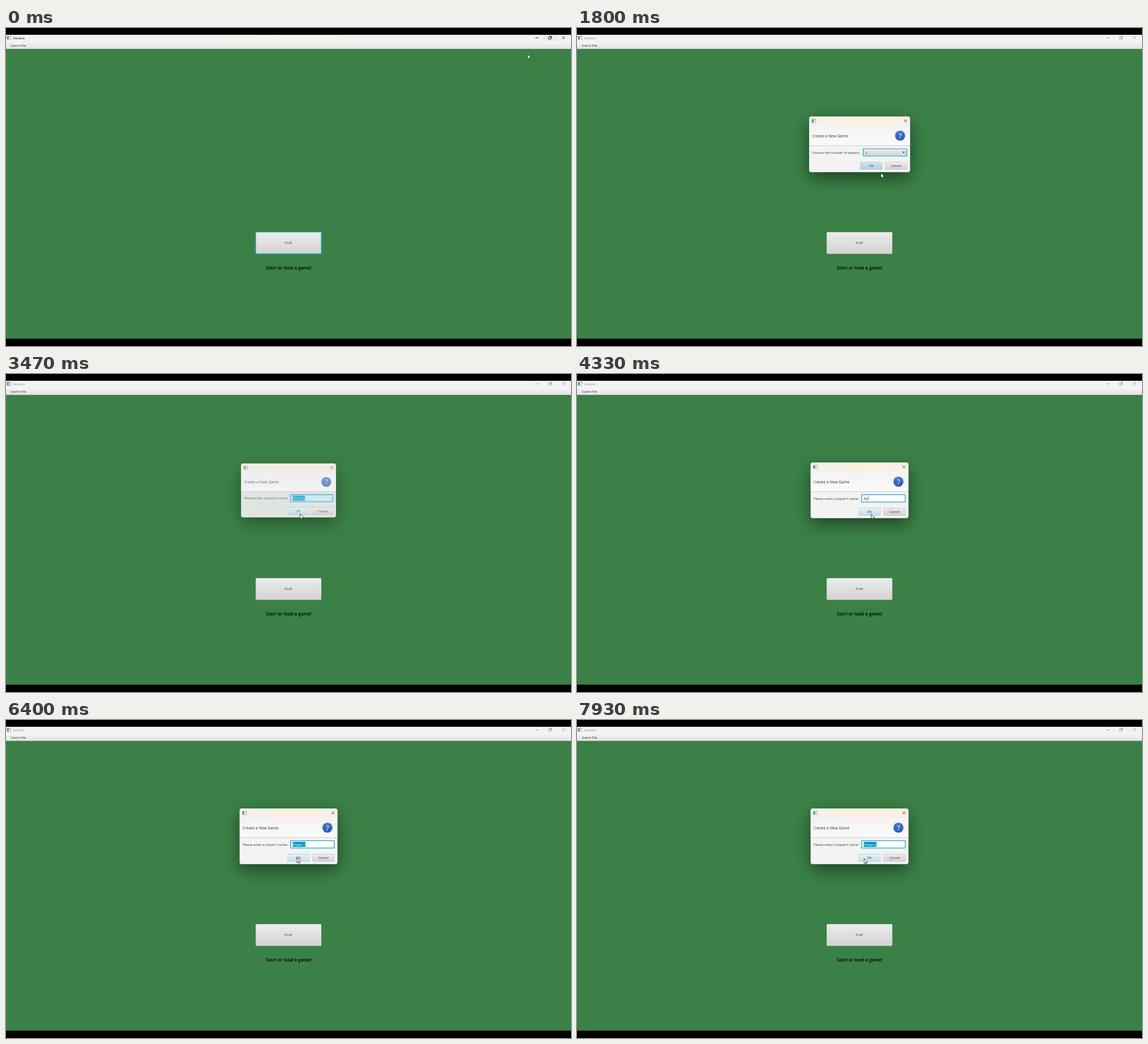
An HTML page with a canvas that plays this animation: 998x561 px, repeating every 8 s.

```html
<!DOCTYPE html>
<html lang="en">
<head>
<meta charset="utf-8">
<title>New game</title>
<style>
html, body { margin: 0; width: 100%; height: 100%; overflow: hidden; background: #000; }
canvas { display: block; width: 998px; height: 561px; }
</style>
</head>
<body>
<canvas id="stage" width="998" height="561"></canvas>
<script>
const ctx = document.getElementById('stage').getContext('2d');
const LOOP = 8000, STEP = 1000 / 15;
const UI = '"Open Sans", "Noto Sans", sans-serif';
const CYAN = '#16a5c8', INK = '#333';

// Pointer stops: time, x, y
const STOPS = [
  [60, 921, 46], [600, 524, 376], [1400, 524, 376], [1990, 541, 217],
  [2200, 541, 217], [2790, 530.5, 248], [2990, 530.5, 248], [3260, 519.5, 247],
  [5070, 519.5, 247], [5520, 464.5, 246], [5900, 464.5, 246], [6500, 518, 243],
  [6650, 518, 243], [6860, 515.5, 242], [6980, 515.5, 242], [7380, 511, 243],
  [7540, 511, 243], [7920, 507, 244.5]
];

// Dialogs: opening time, closing time, painter
const DIALOGS = [
  [1330, 3380, playersDialog],
  [3440, 4590, (t, m) => nameDialog(t, m, 0, true)],
  [4590, 5760, kindDialog],
  [5820, 6620, (t, m) => nameDialog(t, m, 1)],
  [6650, 7480, kindDialog],
  [7550, 9000, (t, m) => nameDialog(t, m, 2)]
];

const clamp = v => Math.max(0, Math.min(1, v));
const ease = v => v * v * (3 - 2 * v);

function pointerAt(t) {
  let [, x, y] = STOPS[0];
  for (let i = 1; i < STOPS.length; i++) {
    const [t0, x0, y0] = STOPS[i - 1], [t1, x1, y1] = STOPS[i];
    if (t < t0) break;
    const k = ease(clamp((t - t0) / (t1 - t0)));
    x = x0 + (x1 - x0) * k;
    y = y0 + (y1 - y0) * k;
  }
  return { x, y };
}

function rect(x, y, w, h, fill) {
  ctx.fillStyle = fill;
  ctx.fillRect(x, y, w, h);
}

function round(x, y, w, h, r, fill) {
  ctx.beginPath();
  ctx.roundRect(x, y, w, h, r);
  ctx.fillStyle = fill;
  ctx.fill();
}

function blend(x0, y0, x1, y1, ...colors) {
  const g = ctx.createLinearGradient(x0, y0, x1, y1);
  colors.forEach((c, i) => g.addColorStop(i / (colors.length - 1), c));
  return g;
}

// Type is laid out at ten times the size so that small advances stay exact
function text(s, x, y, { size = 5.9, color = INK, align = 'left', style = '', skew = 0 } = {}) {
  ctx.save();
  ctx.translate(x, y);
  ctx.transform(0.1, 0, skew * 0.1, 0.1, 0, 0);
  ctx.font = `${style} ${size * 10}px ${UI}`;
  ctx.textAlign = align;
  ctx.fillStyle = color;
  ctx.fillText(s, 0, 0);
  ctx.restore();
}

function line(color, width, ...pts) {
  ctx.beginPath();
  for (let i = 0; i < pts.length; i += 2) ctx.lineTo(pts[i], pts[i + 1]);
  ctx.strokeStyle = color;
  ctx.lineWidth = width;
  ctx.stroke();
}

function cross(x, y, color) {
  line(color, 0.8, x - 2.4, y - 2.4, x + 2.4, y + 2.4);
  line(color, 0.8, x + 2.4, y - 2.4, x - 2.4, y + 2.4);
}

function windowIcon(x, y) {
  rect(x, y, 7.6, 6.6, '#8b9699');
  rect(x + 0.7, y + 1, 6.2, 4.9, '#f2f5f5');
  rect(x + 0.9, y + 1.3, 2.5, 4.2, '#427a78');
}

function button(label, x, y, w, h, mouse, { focus, primary } = {}) {
  const over = mouse && mouse.x >= x && mouse.x <= x + w && mouse.y >= y && mouse.y <= y + h;
  let colors = over ? ['#fafafa', '#e2e2e2'] : ['#ececec', '#d3d3d3'];
  if (primary) colors = over ? ['#e6f2f7', '#c8dfe8'] : ['#d3e6ee', '#b0cfdb'];
  if (focus) {
    round(x - 0.6, y - 0.6, w + 1.2, h + 1.2, 1.8, CYAN);
    round(x + 0.6, y + 0.6, w - 1.2, h - 1.2, 1, blend(0, y, 0, y + h, ...colors));
  } else {
    round(x, y, w, h + 0.4, 1.6, primary ? '#8fb0bd' : '#adadad');
    round(x + 0.5, y + 0.5, w - 1, h - 1, 1.2, blend(0, y, 0, y + h, '#fff', colors[1]));
    round(x + 0.5, y + 1, w - 1, h - 1.5, 1.2, blend(0, y, 0, y + h, ...colors));
  }
  text(label, x + w / 2, y + h / 2 + 2.1, { align: 'center' });
}

function mainWindow(t, mouse) {
  const active = t < 1330;
  const tone = active ? '#111' : '#919191';
  rect(0, 0, 998, 561, '#000');
  rect(0, 12, 998, 12, active
    ? blend(0, 0, 998, 0, '#f1f3f4', '#f3f3f1', '#f8f3ea', '#f4f3f0', '#f2f3f3')
    : '#f3f3f3');
  windowIcon(1.4, 14);
  text(NAMES.game, 12.5, 20, { color: tone });

  if (t < 130) rect(949, 12, 24, 11.5, '#e9e9e8');
  line(tone, 0.9, 935, 17.4, 940.4, 17.4);
  ctx.lineWidth = 0.8;
  ctx.strokeRect(958.6, 15.8, 3.8, 3.8);
  line(tone, 0.8, 960, 14.6, 963.5, 14.6, 963.5, 18.4);
  cross(984.8, 17, tone);

  rect(0, 24, 998, 13, blend(0, 24, 0, 37, '#f6f6f6', '#e1e1e1'));
  rect(0, 36.4, 998, 0.6, '#c3c8c3');
  text('Game File', 8.4, 32.5);
  rect(0, 37, 998, 511, '#3b8147');
  rect(0, 547.5, 998, 0.8, '#2b5c34');

  button('PLAY', 441, 360, 116, 38.3, active && mouse, { focus: active });
  text('Start or load a game!', 499.6, 425.8,
    { size: 8.35, color: '#000', align: 'center', style: 'italic 600', skew: 0.15 });
}

function dialogFrame(x, y, w, h) {
  const r = x + w;
  ctx.save();
  ctx.shadowColor = 'rgba(0,0,0,.5)';
  ctx.shadowBlur = 30;
  ctx.shadowOffsetY = 10;
  round(x, y, w, h, 4, '#f2f2f2');
  ctx.restore();

  ctx.save();
  ctx.beginPath();
  ctx.roundRect(x, y, w, h, 4);
  ctx.clip();
  rect(x, y, w, h, '#f3f3f3');
  rect(x, y, w, 16, blend(x, 0, r, 0, '#f2f2ee', '#faf0e2', '#fbf0e2', '#f7f1e8'));
  rect(x, y + 16, w, 35, blend(0, y + 16, 0, y + 51, '#f3f3f3', '#fafafa'));
  rect(x, y + 50.7, w, 0.7, '#bdbdbd');
  ctx.restore();

  windowIcon(x + 4.6, y + 4.4);
  cross(r - 7.9, y + 7.6, '#222');
  text('Create a New Game', x + 5.4, y + 36.2, { size: 6.85 });

  const cx = r - 17.6, cy = y + 33.6;
  for (const [rad, fill] of [[10.4, '#cfd3d8'], [9.9, '#fff'],
    [8.9, blend(0, cy - 9, 0, cy + 9, '#4a79c6', '#2758ab')]]) {
    ctx.beginPath();
    ctx.arc(cx, cy, rad, 0, 7);
    ctx.fillStyle = fill;
    ctx.fill();
  }
  text('?', cx, cy + 4.7, { size: 13, color: '#fff', align: 'center' });
}

function playersDialog(t, mouse) {
  dialogFrame(410, 156.3, 178.3, 98);
  text('Choose the number of players:', 415.3, 221.7);
  const open = t >= 2130 && t < 2920;
  button('OK', 500, 236.2, 39.3, 13, !open && mouse, { primary: true });
  button('Cancel', 544, 236.2, 39.3, 13, !open && mouse);
  button('', 505.5, 213, 77.3, 13, mouse, { focus: true });
  text(t < 2920 ? '2' : '3', 509.3, 221.7);
  ctx.beginPath();
  ctx.moveTo(574.6, 218.3);
  ctx.lineTo(579.2, 218.3);
  ctx.lineTo(576.9, 220.8);
  ctx.fillStyle = INK;
  ctx.fill();
  if (open) playersList(mouse);
}

function playersList(mouse) {
  const x = 505.4, y = 226.2, w = 77.6, row = 13;
  ctx.save();
  ctx.shadowColor = 'rgba(0,0,0,.45)';
  ctx.shadowBlur = 8;
  ctx.shadowOffsetY = 2;
  rect(x, y, w, row * 5 + 1, '#fff');
  ctx.restore();
  const hover = Math.floor((mouse.y - y) / row);
  for (let i = 0; i < 5; i++) {
    const lit = i === 0 || i === hover;
    if (lit) rect(x + 0.3, y + i * row, w - 0.6, row, '#0fa2c4');
    text(String(i + 2), x + 2.9, y + i * row + 8.9, { color: lit ? '#fff' : INK });
  }
  if (hover === 1) rect(x + 0.3, y + row - 0.2, w - 0.6, 0.4, '#3db5cf');
}

function nameDialog(t, mouse, index, typed) {
  dialogFrame(412.7, 156.3, 172.7, 98);
  text("Please enter a player's name:", 418, 221.7, { size: 5.86 });
  round(502, 212.3, 78.5, 14.2, 1.8, CYAN);
  round(503.3, 213.6, 75.9, 11.6, 1, '#fff');
  if (typed && t >= 4065) {
    const count = t < 4265 ? 1 : t < 4330 ? 2 : 3;
    text(NAMES.player.slice(0, count), 506.8, 221.7);
    rect(506.8 + [0, 3.9, 7.1, 10.2][count], 214.8, 0.6, 8.8, '#222');
  } else {
    rect(506.4, 214.9, 22.6, 9, '#0b97c0');
    text('Player ' + index, 506.8, 221.7, { color: '#fff' });
  }
  button('OK', 496.9, 236.2, 39.3, 13, mouse, { primary: true });
  button('Cancel', 541, 236.2, 39.3, 13, mouse);
}

function kindDialog(t, mouse) {
  dialogFrame(405.3, 155.9, 187.3, 100.6);
  text('Choose whether this player is a human player or a', 410.6, 222.3, { size: 5.88 });
  text('computerized opponent.', 410.6, 231.2, { size: 5.88 });
  button('Human', 435.5, 238.3, 39, 12.7, mouse, { focus: true, primary: true });
  button('Computer', 479.6, 238.3, 39, 12.7, mouse);
  button('Cancel', 548.2, 238.3, 39, 12.7, mouse);
}

function pointer({ x, y }) {
  const shape = [0, 0, 0, 8.7, 2, 6.9, 3.3, 9.8, 4.6, 9.2, 3.4, 6.4, 6.1, 6.3];
  ctx.beginPath();
  for (let i = 0; i < shape.length; i += 2) ctx.lineTo(x + shape[i], y + shape[i + 1]);
  ctx.closePath();
  ctx.fillStyle = '#fff';
  ctx.fill();
  ctx.strokeStyle = '#111';
  ctx.lineWidth = 0.7;
  ctx.stroke();
}

const NAMES = { game: 'Vendoli', player: 'Bex' };

function render(t) {
  const mouse = pointerAt(t);
  mainWindow(t, mouse);
  for (const [start, end, paint] of DIALOGS) {
    if (t < start || t >= end) continue;
    const k = clamp(0.5 + (t - start) / 130);
    ctx.save();
    ctx.globalAlpha = k;
    ctx.translate(499, 206);
    ctx.scale(0.9 + 0.1 * k, 0.9 + 0.1 * k);
    ctx.translate(-499, -206);
    paint(t, mouse);
    ctx.restore();
  }
  pointer(mouse);
}

const began = performance.now();
function tick() {
  const t = (performance.now() - began) % LOOP;
  render(Math.floor((t + 1) / STEP) * STEP);
  requestAnimationFrame(tick);
}
tick();
</script>
</body>
</html>
```
